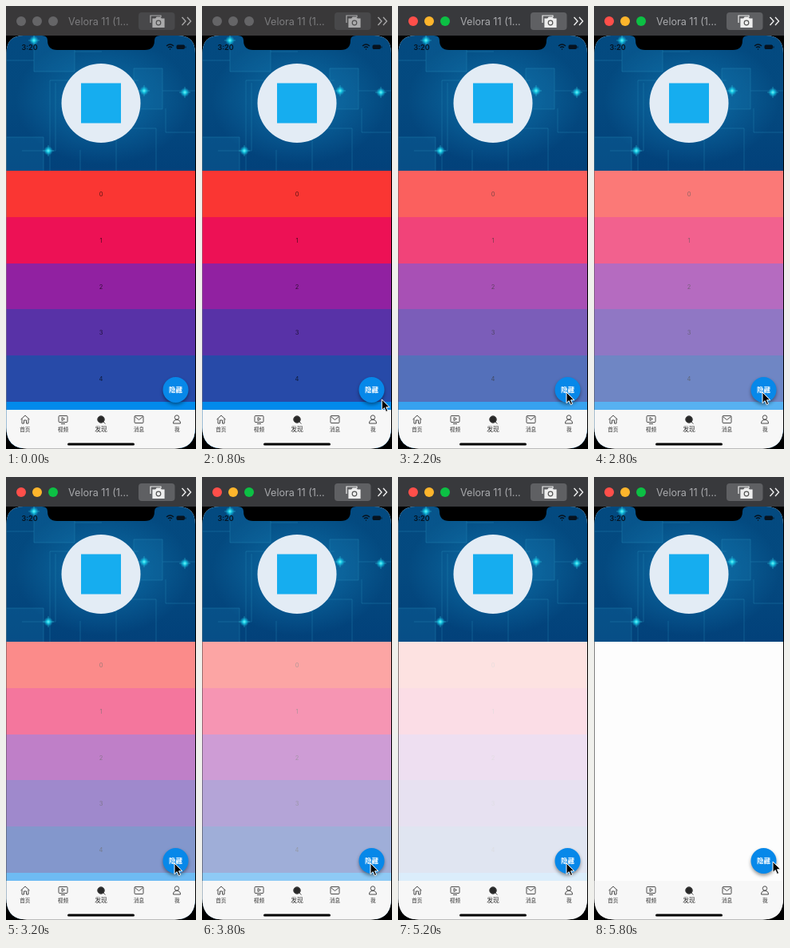
An HTML page that plays this animation: 238 by 554 pixels, repeating every 6000 ms.

```html
<!DOCTYPE html>
<html lang="zh">
<head>
<meta charset="utf-8">
<style>
html, body { margin: 0; width: 100%; height: 100%; overflow: hidden; background: #000; }
svg { display: block; width: 238px; height: 554px; font-family: "Noto Sans CJK SC", "Noto Sans CJK", sans-serif; }
.latin { font-family: Inter, sans-serif; }
.line { fill: none; stroke: #4b4b4b; stroke-width: 1; stroke-linejoin: round; }
rect.flat { shape-rendering: crispEdges; }
</style>
</head>
<body>
<svg viewBox="0 0 238 554">
  <defs>
    <linearGradient id="sky" x2="0" y2="1">
      <stop offset="0" stop-color="#034a80"/>
      <stop offset=".5" stop-color="#04497f"/>
      <stop offset="1" stop-color="#02417a"/>
    </linearGradient>
    <radialGradient id="haze">
      <stop offset="0" stop-color="#117fba" stop-opacity=".7"/>
      <stop offset="1" stop-color="#117fba" stop-opacity="0"/>
    </radialGradient>
    <radialGradient id="glow">
      <stop offset="0" stop-color="#8ffcff"/>
      <stop offset=".35" stop-color="#18d8ee" stop-opacity=".85"/>
      <stop offset="1" stop-color="#10a8d8" stop-opacity="0"/>
    </radialGradient>
    <clipPath id="screen"><path d="M.5 59Q.5 37 22 37H215.500Q237 37 237 59V527Q237 553.500 211 553.500H26.500Q.5 553.500 .5 527Z"/></clipPath>
    <clipPath id="photo"><rect y="37" width="238" height="169"/></clipPath>
    <filter id="soft" x="-50%" y="-50%" width="200%" height="200%"><feGaussianBlur stdDeviation="2"/></filter>
  </defs>

  <rect id="bar" width="238" height="37"/>
  <g id="lights"></g>
  <text id="title" class="latin" x="78" y="24" font-size="12.6">Velora 11 (1...</text>
  <rect id="key" x="166" y="8" width="45.500" height="22" rx="4"/>
  <g id="tools" fill="none" stroke="#eee" stroke-width="1.2">
    <path d="M181 21V12H194V14"/>
    <path d="M184 16H187.500L189 14H193L194.500 16H198V26.500H184Z" fill="#eee"/>
    <circle cx="191" cy="21" r="2.800" stroke="#555"/>
    <path d="M220.500 14L225 19L220.500 24M227 14L231.500 19L227 24" stroke-width="1.4"/>
  </g>

  <g clip-path="url(#screen)">
    <rect y="37" width="238" height="517" fill="#fdfdfd"/>
    <g clip-path="url(#photo)">
      <rect y="37" width="238" height="170" fill="url(#sky)"/>
      <ellipse cx="122" cy="118" rx="110" ry="80" fill="url(#haze)"/>
      <g fill="#1a83b8" fill-opacity=".2" stroke="#2387b5" stroke-opacity=".5" stroke-width=".8">
        <path d="M35 36H86V82H35ZM160 78H196V129H160ZM0 164H47V207H0Z"/>
        <path d="M55 207V93H166M138 207V153H188V207M0 68H35M86 57H120M196 106H238M62 96V181H20M200 128V158H238M93 180V207" fill="none"/>
      </g>
      <g id="sparks"></g>
    </g>
    <circle cx="119" cy="121.500" r="49.500" fill="#e3ecf5"/>
    <rect x="94" y="96.500" width="50" height="50" fill="#16adef"/>

    <path d="M45 37Q52 37 52 43Q52 55 64 55H174Q186 55 186 43Q186 37 193 37Z" fill="#000"/>
    <text class="latin" x="19.500" y="54.500" font-size="9" font-weight="600" fill="#06131f">3:20</text>
    <g fill="none" stroke="#06131f" stroke-width="1.4">
      <path d="M201 50Q205.500 46 210 50M203 52Q205.500 50 208 52M205 54H206"/>
      <rect x="214" y="49" width="9.500" height="4.500" rx="1" fill="#06131f" stroke-width="1"/>
      <path d="M225 50.500V52.500" stroke-width="1"/>
    </g>

    <g id="list"></g>

    <circle cx="212.500" cy="482.500" r="16" fill="#000" opacity=".4" filter="url(#soft)"/>
    <circle id="fab" cx="212.500" cy="480" r="16"/>
    <text x="212.500" y="483" font-size="8.500" font-weight="700" fill="#fff" text-anchor="middle">隐藏</text>

    <rect class="flat" y="505" width="238" height="49" fill="#f7f7f7"/>
    <g class="line">
      <path d="M18.500 517L24 512L29.500 517M20 516V522H22.500V518H25.500V522H28V516"/>
      <rect x="66" y="512.500" width="11" height="8" rx="1"/>
      <path d="M70 514.500L73.500 516.500L70 518.500ZM69 522.500H74"/>
      <circle cx="119" cy="517" r="4.300" fill="#282828"/>
      <path d="M122 520L124.500 522.500"/>
      <rect x="161" y="512.500" width="11" height="9" rx="1"/>
      <path d="M161.500 513.500L166.500 517.500L171.500 513.500"/>
      <circle cx="214" cy="514.500" r="2.700"/>
      <path d="M209.500 522Q209.500 517.500 214 517.500Q218.500 517.500 218.500 522Z"/>
    </g>
    <g id="tabs" fill="#333" text-anchor="middle"></g>
    <rect x="77" y="546.500" width="84" height="3" rx="1.500" fill="#000"/>
  </g>
  <path id="cursor" d="M0 0V13.500L3.200 10.600L5.300 15.500L7.600 14.500L5.500 9.800H9.800Z" fill="#000" stroke="#fff" stroke-width="1"/>
</svg>
<script>
const LOOP = 6000, STEP = 200;
const $ = id => document.getElementById(id);
const clamp = v => Math.max(0, Math.min(1, v));
const fill = (id, items, draw) => $(id).innerHTML = items.map(draw).join('');

fill('lights', [19, 39, 59], x => `<circle cx="${x}" cy="19" r="6"/>`);
fill('sparks', [[35, 43], [173, 106], [224, 108], [53, 181]], ([x, y]) =>
  `<circle cx="${x}" cy="${y}" r="6" fill="url(#glow)"/>
   <path d="M${x - 7} ${y}h14M${x} ${y - 7}v14" stroke="#3be4f2" stroke-width=".6" opacity=".6"/>`);

const rowTop = i => Math.round(206 + i * 57.8);
fill('list', ['#fa3633', '#ed1155', '#9121a1', '#5832a7', '#274aa8', '#028aeb'], (color, i) => {
  const y = rowTop(i);
  return `<rect class="flat" y="${y}" width="238" height="${rowTop(i + 1) - y}" fill="${color}"/>
    <text class="latin" x="119" y="${y + 32}" font-size="7.500" text-anchor="middle" fill="#000" fill-opacity=".65">${i}</text>`;
});
fill('tabs', ['首页', '视频', '发现', '消息', '我'], (label, i) =>
  `<text x="${23.8 + i * 47.6}" y="532.300" font-size="${i === 2 ? 7.8 : 6.6}">${label}</text>`);

function setWindow(active) {
  const colors = active ? ['#ff4f4a', '#fdb52c', '#0cc044'] : ['#656567', '#656567', '#656567'];
  [...$('lights').children].forEach((dot, i) => dot.setAttribute('fill', colors[i]));
  $('bar').setAttribute('fill', active ? '#38393c' : '#393839');
  $('title').setAttribute('fill', active ? '#a9aaad' : '#7d7d7f');
  $('key').setAttribute('fill', active ? '#5f6063' : '#48484a');
  $('tools').setAttribute('opacity', active ? 1 : .6);
}

function moveCursor(t) {
  const enter = 1 - clamp((t - 600) / 600);
  const leave = clamp((t - 5400) / 400);
  const x = 211 + 32 * enter * enter + 13 * leave;
  const y = 483 + 20 * enter * enter - 2 * leave;
  $('cursor').setAttribute('transform', `translate(${x} ${y})`);
}

function render(now) {
  const t = Math.floor((now % LOOP) / STEP) * STEP;
  setWindow(t >= 1200);
  moveCursor(t);
  $('list').setAttribute('opacity', clamp((5800 - t) / 4560));
  $('fab').setAttribute('fill', t >= 1200 && t < 1800 ? '#078bd8' : '#0788e9');
}

const start = performance.now();
function tick() {
  render(performance.now() - start);
  requestAnimationFrame(tick);
}
tick();
</script>
</body>
</html>
```
